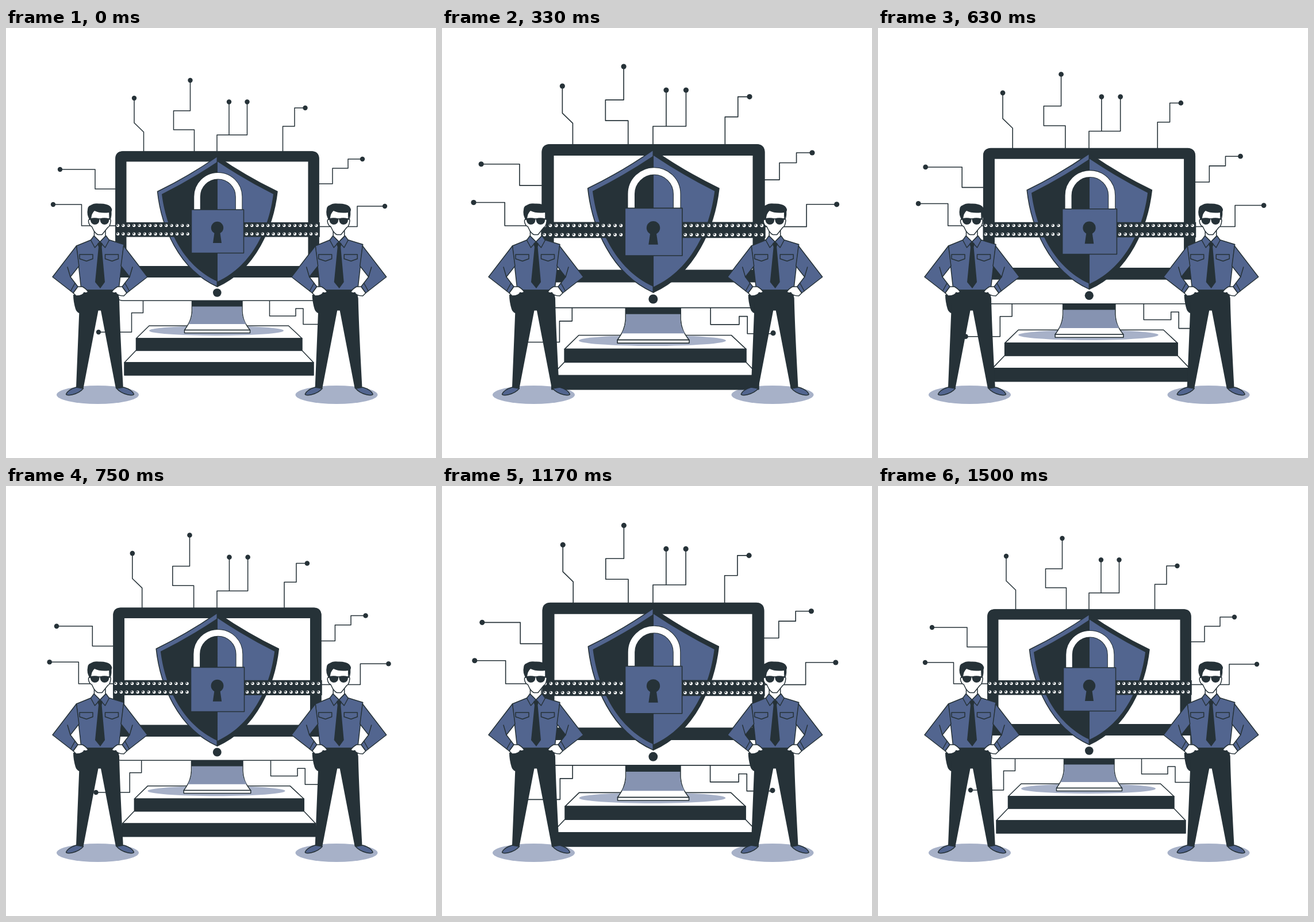
Write an HTML page that moves like this. It is 748 by 748 pixels and loops after 1.54 s.

```html
<!DOCTYPE html>
<html lang="en">
<head>
<meta charset="utf-8">
<title>Guarded computer</title>
<style>
  html, body { margin: 0; width: 100%; height: 100%; overflow: hidden; background: #fff; }
  svg { display: block; width: 100%; height: 100%; }
  #device { transform-origin: 367px 344px; }
  .ink { fill: #263238; }
  .blue { fill: #52658f; }
  .white { fill: #fff; }
  .pale { fill: #a7b1c8; }
  .line { fill: none; }
  .edge { stroke: #263238; stroke-width: 1.5; stroke-linejoin: round; stroke-linecap: round; }
  .studs { fill: none; stroke: #fff; stroke-width: 5.2; stroke-linecap: round; stroke-dasharray: 0 9.35; }
  .holes { fill: none; stroke: #263238; stroke-width: 2.3; stroke-linecap: round; stroke-dasharray: 0 9.35; }
</style>
</head>
<body>
<svg viewBox="0 0 748 748">
  <defs>
    <g id="belt">
      <path class="ink" d="M0 338H132V363.5H0Z"/>
      <path class="studs" d="M4.6 343.6H127M4.6 358.2H127"/>
      <path class="holes" d="M3.8 342.9H126M3.8 357.5H126"/>
    </g>

    <!-- left side of a guard, mirrored for the right -->
    <g id="side" class="edge">
      <path class="blue" d="M122 625Q108 629 104.5 637Q106 640 115 638Q128 635 134.5 627Z"/>
      <path class="blue" d="M122.500 379L81 433L117 461L125 450L112 433L127 414Z"/>
      <path class="line" d="M107 416L112 433M112.500 457.500L120 444"/>
      <path class="white" d="M117 461L125 450L133 450Q140 454 143 459Q139 462 136 460Q134 466 122 466Z"/>
    </g>
    <path id="pocket" class="line edge" d="M128 394H151V401.500L140 405.500L128 401.500Z"/>
    <path id="collar" class="blue edge" d="M153 361.500L147.500 369L154.500 382L163.500 372Z"/>
    <path id="lens" class="ink" d="M146.500 331.500Q154 329 162.500 331.500Q163 342 154.500 342Q147 342 146.500 331.500Z"/>

    <g id="guard">
      <path class="ink" d="M117 464H132V497Q123 496 121 489Q117 476 117 464Z"/>
      <path class="ink" d="M134 454H193L197 470Q198 520 203.800 625Q197 629 191 627L165 491.500H160.500L134.500 627Q128 629 122 625L128 478Z"/>
      <path class="blue edge" d="M152 367L122.500 379L131 456H196L205 376.500L174 367Z"/>
      <path class="ink" d="M132 455.500H195.500L196 469H130Z"/>
      <use href="#side"/>
      <use href="#side" transform="matrix(-1 0 0 1 327 0)"/>
      <use href="#pocket"/>
      <use href="#pocket" x="44.500"/>
      <path class="white edge" d="M153.500 348V362L163.500 372L173 362V348Z"/>
      <use href="#collar"/>
      <use href="#collar" transform="matrix(-1 0 0 1 327 0)"/>
      <path class="ink" d="M159 375L163.500 371L168 375L166.500 381L172 442L164 453L155 442L161 381Z"/>
      <path class="white edge" d="M147 333Q142 332 144 339Q146 345 149 345L153 353Q157 358.500 160 359.500H167L177 347Q181 345 182 337Q183 332 180 333V316H148Z"/>
      <path class="ink" d="M145.500 334Q140 324 142 316Q142 310 147 308.500Q153 304 162 305.500Q175 305 181 310Q186 315 183.500 319.500Q184 328 181.500 334L179.500 321Q164 323 154 318Q149 322 148 332Z"/>
      <use href="#lens"/>
      <use href="#lens" x="16.800"/>
      <path class="line edge" d="M145 332H181"/>
    </g>
  </defs>

  <ellipse class="pale" cx="159.500" cy="638" rx="71.500" ry="16"/>
  <ellipse class="pale" cx="575" cy="638" rx="71.500" ry="16"/>

  <g id="device">
    <path class="line edge" d="M223 122V165L239.500 181V215M320.500 91V144H291.500V177H327.500V215M388 128V186M419.500 128V186H367V215M520.500 139H502V171H481.500V215M620 228H595V244H568V271H544M659 310H611V345.500H540M94 246H155V280H190M82 307H131.500V344H192M161 529H218.500V495.500H238.500V474M458.500 474V501H504V488H517V515.500H558"/>
    <g id="nodes" class="ink"></g>

    <g class="edge">
      <path class="white" d="M226 561L206 582H535L515 561Z"/>
      <path class="ink" d="M206 582H535V604H206Z"/>
      <path class="white" d="M249 518H491.500L515 540H226.500Z"/>
      <path class="ink" d="M226.500 540H515V560.500H226.500Z"/>
    </g>
    <ellipse class="pale" cx="366" cy="526.500" rx="117" ry="8.500"/>
    <path class="white edge" d="M323.500 474V492C323 506 318 515 310.500 525.500H424.500C416 515 411.500 506 411 492V474Z"/>
    <path fill="#8693b1" d="M324.200 484V492C324 502 321 509 317.300 515H417.500C413.500 508 410.500 502 410.300 492V484Z"/>
    <path class="ink" d="M323.500 474H411V484.500H323.500Z"/>
    <path class="white edge" d="M310.500 525.500H424.500V530.500H310.500Z"/>

    <rect class="white edge" x="191" y="215" width="353" height="259.300" rx="12"/>
    <path class="ink" d="M190.300 434V227Q190.300 214.500 203 214.500H532Q544.500 214.500 544.500 227V434Z"/>
    <path class="white" d="M209.500 232.500H525.500V414H209.500Z"/>
    <circle class="ink" cx="367.300" cy="460.500" r="7.300"/>

    <path class="blue edge" d="M367.500 223.500Q318 258 263.500 284.500C270 345 300 420 367.500 450Z"/>
    <path class="ink edge" d="M367.500 223.500Q417 258 472 284.500C465 345 435 420 367.500 450Z"/>
    <path class="ink" d="M368 232.500Q321 264 271 289C278 345 305 412 368 441Z"/>
    <path class="blue" d="M368 232.500Q415 264 465 289C458 345 431 412 368 441Z"/>

    <use href="#belt" x="190"/>
    <use href="#belt" x="413.800"/>
    <path class="line" stroke="#263238" stroke-width="12.500" d="M332.500 316V293.500A36.300 36.300 0 0 1 405.100 293.500V316"/>
    <path class="line" stroke="#fff" stroke-width="10.500" d="M332.500 316V293.500A36.300 36.300 0 0 1 405.100 293.500V316"/>
    <rect class="blue edge" x="322.500" y="316" width="91" height="75.500"/>
    <circle class="ink" cx="367.500" cy="347.500" r="10.700"/>
    <path class="ink" d="M363 353H372L375 374H360Z"/>
  </g>

  <use href="#guard"/>
  <use href="#guard" x="415.700"/>
</svg>
<script>
  const device = document.getElementById('device');
  const ends = [[223, 122], [320.5, 91], [388, 128.5], [419.5, 128.5], [520.5, 139],
    [620, 228], [659, 310], [94, 246], [82, 307], [161, 529], [558, 514.5]];
  document.getElementById('nodes').innerHTML =
    ends.map(([x, y]) => `<circle cx="${x}" cy="${y}" r="4.2"/>`).join('');

  // Heartbeat: [step, scale], two beats at 24 steps per second
  const beat = [[0, 1], [7.6, 1.098], [12, 1.061], [18, 1.022], [21.5, 1],
    [23, 1.022], [26, 1.065], [28.3, 1.092], [36, 1]];
  const LOOP = 1540;

  function scaleAt(step) {
    const i = Math.max(1, beat.findIndex(([s]) => s >= step));
    const [s0, v0] = beat[i - 1], [s1, v1] = beat[i];
    return v0 + (v1 - v0) * (step - s0) / (s1 - s0);
  }

  const start = performance.now();
  function draw() {
    const t = (performance.now() - start) % LOOP;
    const step = Math.min(36, Math.floor((t + 5) * 0.024));
    device.style.transform = `scale(${scaleAt(step)})`;
    requestAnimationFrame(draw);
  }
  draw();
</script>
</body>
</html>
```
